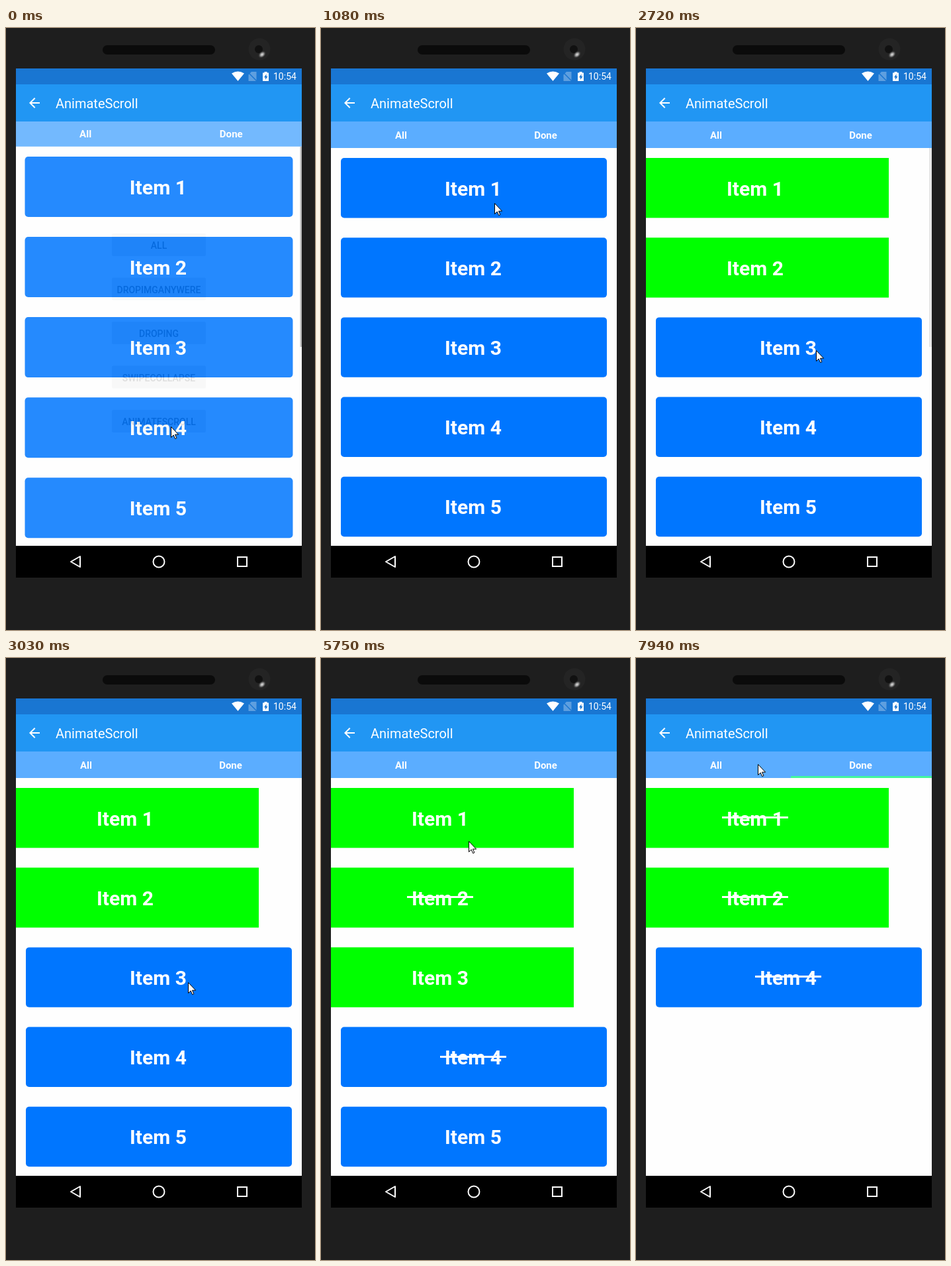
Write an HTML page that moves like this. It is 467 px wide and 908 px high and loops after 8000 ms.

```html
<!DOCTYPE html>
<html lang="en">
<head>
<meta charset="utf-8">
<title>AnimateScroll</title>
<style>
  html, body { margin: 0; width: 100%; height: 100%; overflow: hidden; background: #1e1e1e; }
  svg { display: block; width: 467px; height: 908px; font-family: Roboto, sans-serif; }
  .bold { font-weight: 700; fill: #fff; text-anchor: middle; }
  .item { font-size: 30px; }
  .tab { font-size: 15px; }
  .ghost { font-size: 14px; font-weight: 500; text-anchor: middle; fill: #222; }
</style>
</head>
<body>
<svg viewBox="0 0 467 908">
  <defs>
    <clipPath id="view"><rect x="15" y="141" width="432" height="640"/></clipPath>
    <radialGradient id="glint">
      <stop offset="0" stop-color="#e8e8e8"/>
      <stop offset=".45" stop-color="#8a8a8a"/>
      <stop offset="1" stop-color="#232323" stop-opacity="0"/>
    </radialGradient>
  </defs>

  <!-- phone body -->
  <rect width="467" height="908" fill="#1e1e1e"/>
  <rect x="146" y="26" width="170" height="14" rx="7" fill="#0b0b0b"/>
  <circle cx="383" cy="32" r="16.5" fill="#242424"/>
  <circle cx="382" cy="32" r="6" fill="#111"/>
  <ellipse cx="387" cy="40" rx="7" ry="5" fill="url(#glint)" transform="rotate(-40 387 40)"/>

  <!-- status bar and toolbar -->
  <rect x="15" y="61" width="432" height="24" fill="#1976d2"/>
  <rect x="15" y="85" width="432" height="56" fill="#2196f3"/>
  <g fill="#fff">
    <path d="M350.5 80L341 68.6Q350.5 62.6 360 68.6Z"/>
    <path d="M371 66h7.5v14h-12v-9.500zM366 67l13 13" opacity=".3"/>
    <path d="M366 67l13 13" stroke="#1976d2" stroke-width="1.5"/>
    <path d="M390.500 66h4v1.500h2.500v12.500h-9v-12.500h2.500z"/>
    <path d="M393.500 69.500l-3.500 5h2v3.500l3.500-5h-2z" fill="#1976d2"/>
    <text x="404" y="78" font-size="14">10:54</text>
    <path transform="translate(31 101)" d="M20 11H7.830l5.590-5.590L12 4l-8 8 8 8 1.410-1.410L7.830 13H20z"/>
    <text x="75" y="121" font-size="20">AnimateScroll</text>
  </g>

  <!-- content -->
  <g clip-path="url(#view)">
    <rect x="15" y="141" width="432" height="640" fill="#fefefe"/>
    <g id="menu"></g>
    <g id="page">
      <rect x="15" y="141" width="432" height="640" fill="#fefefe"/>
      <rect x="10" y="135" width="442" height="46" fill="#5badff"/>
      <text class="bold tab" x="121" y="167">All</text>
      <text class="bold tab" x="339.500" y="167">Done</text>
      <rect id="mark" x="234" y="178" width="213" height="3" fill="#43f79d"/>
      <g id="list"></g>
      <rect id="bar" x="443" y="181" width="4" height="300" fill="#b2b2b2"/>
    </g>
  </g>

  <!-- navigation bar -->
  <rect x="15" y="781" width="432" height="48"/>
  <g fill="none" stroke="#fff" stroke-width="2">
    <path d="M98 805L112 797V813Z" stroke-linejoin="round"/>
    <circle cx="231" cy="805" r="8.500"/>
    <rect x="350" y="798" width="14" height="14"/>
  </g>

  <path id="cursor" d="M.5.5V16.500L4.200 13 6.700 18.600 8.900 17.600 6.500 12.200H11.600Z" fill="#fff" stroke="#000"/>
</svg>
<script>
const LOOP = 8000, FADE_IN = 120, FILTER = 6900;

// Screen updates: first time, last time, number of updates.
const runs = [
  [0, 120, 2], [500, 1540, 8], [1670, 2600, 8], [2720, 2720, 1], [2870, 3690, 7],
  [3840, 4000, 2], [4150, 4850, 6], [4990, 4990, 1], [5390, 5750, 4],
  [5870, 6020, 2], [6300, 7070, 6], [7810, 7940, 2]
];
const ticks = runs.flatMap(([a, b, n]) =>
  Array.from({ length: n }, (_, i) => Math.round(a + (b - a) * i / Math.max(1, n - 1))));

// Pointer path: time, x, y.
const path = [
  [370, 249, 601], [950, 262, 262], [1250, 120, 275], [1540, 108, 283],
  [2050, 250, 355], [2330, 120, 360], [2600, 258, 480], [2720, 272, 486],
  [3050, 276, 490], [3350, 140, 485], [3690, 165, 440], [4000, 185, 356],
  [4150, 185, 356], [4420, 200, 232], [4700, 281, 480], [4850, 265, 607],
  [4990, 238, 612], [5390, 238, 612], [5750, 223, 276], [6020, 319, 247],
  [6300, 319, 247], [6700, 342, 166], [7680, 342, 166], [7940, 184, 160]
];

const wakes = [300, 1115, 2345, 3215];
const items = [
  { swipe: 950, strike: 6300 },
  { swipe: 2050, strike: 4150 },
  { swipe: 3050 },
  { strike: 5390 },
  {}
];

const $ = id => document.getElementById(id);
const clamp = v => Math.min(1, Math.max(0, v));
const show = (el, on) => el.setAttribute('visibility', on ? 'inherit' : 'hidden');

function add(parent, tag, attrs, text) {
  const el = document.createElementNS('http://www.w3.org/2000/svg', tag);
  for (const k in attrs) el.setAttribute(k, attrs[k]);
  if (text) el.textContent = text;
  return parent.appendChild(el);
}

['ALL', 'DROPIMGANYWERE', 'DROPING', 'SWIPECOLLAPSE', 'ANIMATESCROLL'].forEach((name, i) => {
  const y = 310 + 66.5 * i;
  add($('menu'), 'rect', { x: 160, y, width: 142, height: 34, rx: 2, fill: '#d6d7d7' });
  add($('menu'), 'text', { class: 'ghost', x: 231, y: y + 23 }, name);
});

items.forEach((it, i) => {
  it.g = add($('list'), 'g', {});
  it.box = add(it.g, 'rect', { x: 30, width: 402, height: 90.4 });
  it.label = add(it.g, 'text', { class: 'bold item', x: 230 }, 'Item ' + (i + 1));
  it.line = add(it.g, 'rect', { x: 180, width: 100, height: 3, fill: '#fff' });
});

function pointer(t) {
  const i = path.findIndex(p => p[0] > t);
  if (i === 0) return path[0].slice(1);
  if (i < 0) return path[path.length - 1].slice(1);
  const [a, b] = [path[i - 1], path[i]];
  const k = (t - a[0]) / (b[0] - a[0]);
  return [1, 2].map(n => Math.round(a[n] + (b[n] - a[n]) * k));
}

function draw(t) {
  const entering = t < FADE_IN, done = t >= FILTER;
  $('page').setAttribute('opacity', entering ? 0.85 : 1);
  $('page').setAttribute('transform',
    entering ? 'translate(231 483) scale(1.0073) translate(-231 -483)' : '');
  show($('menu'), entering);
  show($('mark'), done);

  let row = 0;
  for (const it of items) {
    const struck = t >= it.strike, visible = !done || struck;
    show(it.g, visible);
    if (!visible) continue;
    const pull = it.swipe ? clamp((t - it.swipe) / 260) : 0;
    const green = pull === 1, top = 196 + 120.2 * row;
    it.g.setAttribute('transform', `translate(${Math.round(-50 * pull)} 0)`);
    it.box.setAttribute('y', top);
    it.box.setAttribute('rx', green ? 0 : 5);
    it.box.setAttribute('fill', green ? '#0f0' : '#0076ff');
    it.label.setAttribute('y', 253 + 120 * row);
    it.line.setAttribute('y', Math.round(top + 43));
    show(it.line, struck);
    row++;
  }

  const wake = wakes.filter(w => w <= t).pop() ?? t;
  $('bar').setAttribute('opacity', clamp(1 - (t - wake - 200) / 250));
  $('cursor').setAttribute('transform', `translate(${pointer(t)})`);
}

const start = performance.now();
function loop() {
  const t = Math.max(0, performance.now() - start) % LOOP;
  draw(ticks.filter(k => k <= t).pop());
  requestAnimationFrame(loop);
}
loop();
</script>
</body>
</html>
```
